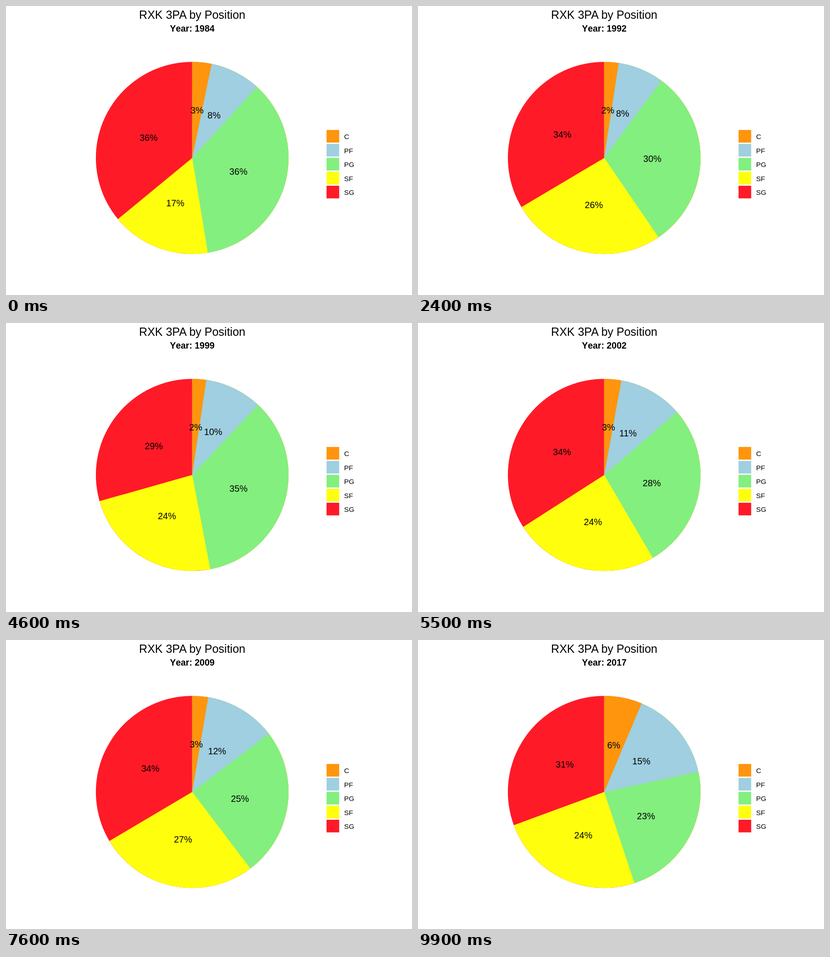
Animation of 885x632 px, one loop 10 s. Source, as an HTML page:

```html
<!DOCTYPE html>
<html lang="en">
<head>
<meta charset="utf-8">
<title>3PA by Position</title>
<style>
  html, body { margin: 0; width: 100%; height: 100%; overflow: hidden; background: #fff; }
  svg { display: block; width: 885px; height: 632px; font-family: "Liberation Sans", Arial, sans-serif; }
  .title { font-size: 25px; }
  .year { font-size: 19.44px; font-weight: bold; font-kerning: none; }
  .share { font-size: 19.76px; }
  .key { font-size: 15.28px; }
  .title, .year, .share { text-anchor: middle; }
</style>
</head>
<body>
<svg id="chart" viewBox="0 0 885 632"></svg>
<script>
const CX = 405.9, CY = 332.3, R = 210;
const LOOP = 10000, STEP = 100, STEPS_PER_YEAR = 3, FIRST_YEAR = 1984;

const positions = [
  ["C", "#ff950d"], ["PF", "#9fcfe0"], ["PG", "#83ef7f"], ["SF", "#ffff0d"], ["SG", "#ff1a27"]
];

// Year, then the cumulative percentage at the end of C, PF, PG and SF.
const history = [
  [1984, 3.24, 11.73, 47.41, 64.02],
  [1985, 2, 9, 44, 71.2],
  [1987, 0.87, 6.76, 39.44, 61.36],
  [1988, 2.5, 11, 41.5, 66],
  [1989, 3.2, 16.4, 44, 69.2],
  [1991, 2, 9, 49.6, 66.4],
  [1992, 2.4, 10.09, 40.47, 66.45],
  [1993, 2.6, 11.62, 49, 64],
  [1994, 2, 10, 45, 66],
  [1996, 1.2, 7.1, 40.3, 68.1],
  [1998, 1.75, 8.9, 43.6, 68.7],
  [1999, 2.2, 11, 46, 70.9],
  [2000, 2.6, 13.9, 49, 70],
  [2001, 2.9, 14.05, 49, 67.5],
  [2002, 2.9, 13.65, 41.3, 65.4],
  [2005, 2.5, 13.2, 44, 69.9],
  [2007, 2.7, 15, 49, 71],
  [2008, 2.7, 16.4, 42.6, 70.6],
  [2009, 2.63, 14.47, 39.4, 66.28],
  [2012, 2.95, 15.9, 42, 68],
  [2015, 3.8, 15, 44.5, 68.8],
  [2016, 5, 17.5, 49, 71.2],
  [2017, 6.35, 21.62, 44.92, 69.38]
];

const chart = document.getElementById("chart");

function add(tag, attrs, text = "") {
  const el = document.createElementNS("http://www.w3.org/2000/svg", tag);
  for (const name in attrs) el.setAttribute(name, attrs[name]);
  el.textContent = text;
  return chart.appendChild(el);
}

function polar(percent, radius) {
  const angle = percent / 100 * 2 * Math.PI;
  return [CX + radius * Math.sin(angle), CY - radius * Math.cos(angle)];
}

function sector(percent) {
  const large = percent > 50 ? 1 : 0;
  return `M${CX},${CY}V${CY - R}A${R},${R} 0 ${large} 1 ${polar(percent, R)}Z`;
}

function boundariesAt(year) {
  const next = Math.max(1, history.findIndex(row => row[0] >= year));
  const a = history[next - 1], b = history[next];
  const k = (year - a[0]) / (b[0] - a[0]);
  return [...a.slice(1).map((v, i) => v + (b[i + 1] - v) * k), 100];
}

add("text", { class: "title", x: CX, y: 28 }, "RXK 3PA by Position");
const yearText = add("text", { class: "year", x: CX, y: 56 });

// Each sector starts at twelve o'clock; smaller ones lie on top.
add("circle", { cx: CX, cy: CY, r: R, fill: positions[4][1] });
const sectors = [];
for (let i = 3; i >= 0; i--) sectors[i] = add("path", { fill: positions[i][1] });
const shares = positions.map(() => add("text", { class: "share" }));

positions.forEach(([name, fill], i) => {
  const y = 271.1 + i * 30.5;
  add("rect", { x: 698.7, y, width: 27.6, height: 27.6, fill });
  add("text", { class: "key", x: 737, y: y + 20.2 }, name);
});

function draw(time) {
  let step = Math.floor(time % LOOP / STEP);
  if (step === 25 || step === 28) step--; // two short pauses
  const year = FIRST_YEAR + step / STEPS_PER_YEAR;
  const ends = boundariesAt(year);

  yearText.textContent = "Year: " + (FIRST_YEAR + Math.floor(step / STEPS_PER_YEAR));
  sectors.forEach((el, i) => el.setAttribute("d", sector(ends[i])));
  shares.forEach((el, i) => {
    const start = i ? ends[i - 1] : 0;
    const [x, y] = polar((start + ends[i]) / 2, R / 2);
    el.setAttribute("x", x);
    el.setAttribute("y", y + 7.2);
    el.textContent = Math.round(ends[i] - start) + "%";
  });
}

const begin = performance.now();
function tick() {
  draw(performance.now() - begin);
  requestAnimationFrame(tick);
}
tick();
</script>
</body>
</html>
```
